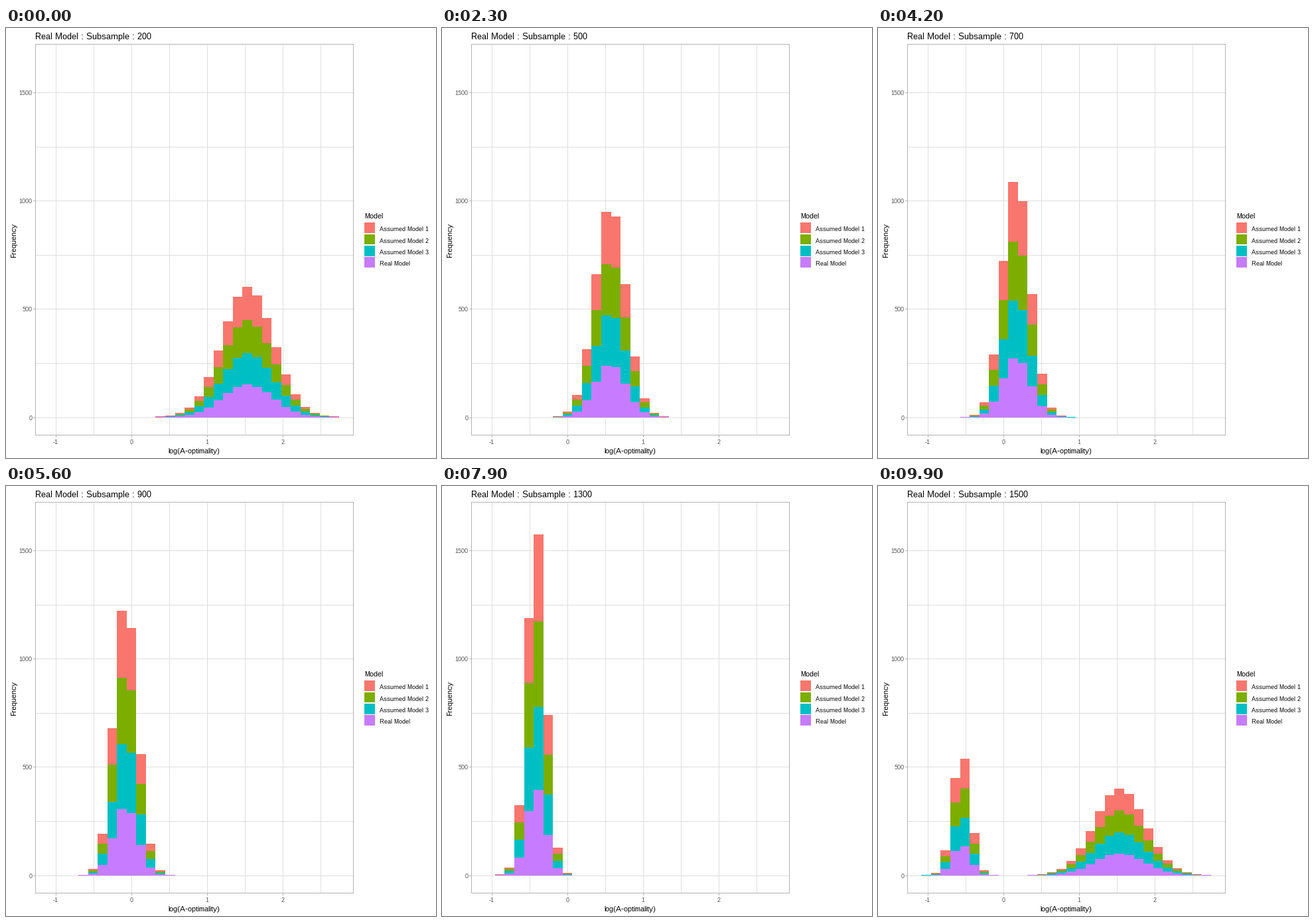
A matplotlib script for the animation above (10000 ms loop, 648 by 648 pixels).

```python
import math

import matplotlib.pyplot as plt
import numpy as np
from matplotlib.animation import FuncAnimation
from matplotlib.patches import Rectangle

plt.rcParams.update({
    "font.family": "Liberation Sans",
    "text.hinting": "native",
    "text.hinting_factor": 1,
})

SIZE, FRAMES, STEP_MS = 648, 100, 100
BINS, BIN_X0, BIN_W = 30, 65.4, 14.55
BASE = 587
ZERO_X, UNIT_X = 189, 114

# Name, colour and relative spread, from the top of the stack down.
MODELS = [("Assumed Model 1", "#F8766D", 0.98),
          ("Assumed Model 2", "#7CAE00", 1.0),
          ("Assumed Model 3", "#00BFC4", 1.03),
          ("Real Model", "#C77CFF", 1.0)]
RUNS = 1000
SIZES = range(200, 1501, 100)
STARTS = [*range(4, 28, 8), *range(28, 99, 7)]

edges = BIN_X0 + BIN_W * np.arange(BINS + 1)


def count_y(count):
    return np.round(586.6 - 0.3264 * np.asarray(count))


def bell_cdf(z):
    """Normal curve with slightly heavy tails."""
    def phi(v):
        return 0.5 * math.erf(v / math.sqrt(2))
    return 0.95 * phi(z / 0.97) + 0.05 * phi(z / 1.5)


def histogram(size):
    """Stacked counts for one subsample size, one row per model."""
    growth = math.log(size / 200)
    mean = 1.54 - 1.08 * growth + 0.02 * growth ** 2
    sd = 0.34 * (200 / size) ** 0.55
    z = ((edges - ZERO_X) / UNIT_X - mean) / sd
    counts = [RUNS * np.diff([bell_cdf(v / spread) for v in z])
              for _, _, spread in MODELS]
    return np.cumsum(np.round(counts)[::-1], axis=0)[::-1]


STACKS = [histogram(size) for size in SIZES]

fig = plt.figure(figsize=(SIZE / 72, SIZE / 72), dpi=72, facecolor="white")
ax = fig.add_axes([0, 0, 1, 1])
ax.set_xlim(0, SIZE)
ax.set_ylim(SIZE, 0)
ax.axis("off")


def box(x, y, w, h, color, z=1):
    ax.add_patch(Rectangle((x, y), w, h, fc=color, lw=0, aa=False, zorder=z))


def label(x, y, text, size, color="black", **kw):
    return ax.text(x, y, text, fontsize=size, color=color,
                   va="baseline", **kw)


GRID, BORDER, TICK_TEXT = "#DEDEDE", "#B3B3B3", "#4D4D4D"

# Grid and panel border
for x in range(75, 500, UNIT_X // 2):
    box(x, 25, 1, 588, GRID)
for count in range(0, 1501, 250):
    box(45, count_y(count), 478, 1, GRID)
for y in (24, 613):
    box(44, y, 480, 1, BORDER, 4)
for x in (44, 523):
    box(x, 24, 1, 590, BORDER, 4)

# Axes
for value in range(-1, 3):
    x = ZERO_X + UNIT_X * value
    box(x, 614, 1, 3, BORDER)
    label(x, 627, str(value), 9, TICK_TEXT, ha="center")
for value in range(0, 1501, 500):
    y = count_y(value)
    box(41, y, 3, 1, BORDER)
    label(39.5, y + 4, str(value), 9, TICK_TEXT, ha="right")
label(283.5, 641, "log(A-optimality)", 11, ha="center")
label(15, 319.5, "Frequency", 11, ha="center", rotation=90,
      rotation_mode="anchor")

# Legend
label(540, 287, "Model", 11)
for i, (name, color, _) in enumerate(MODELS):
    top, bottom = round(293.4 + 17.28 * i), round(309.2 + 17.28 * i)
    box(540, top, 16, bottom - top, color)
    label(563, top + 13, name, 9)

title = label(44, 17, "", 13)
bars = [ax.stairs(np.full(BINS, BASE), np.round(edges), baseline=BASE,
                  fill=True, color=color, lw=0, aa=False, zorder=2)
        for _, color, _ in MODELS]


def draw(frame):
    begun = sum(start <= frame for start in STARTS)
    old, new, t = 0, 0, 1
    if begun:
        old, new = begun - 1, begun % len(STACKS)
        steps = 4 if begun <= 3 else 3
        t = min((frame - STARTS[old] + 1) / steps, 1)
    stack = (1 - t) * STACKS[old] + t * STACKS[new]
    for bar, top in zip(bars, count_y(stack)):
        bar.set_data(values=top)
    shown = SIZES[new if t == 1 else old]
    title.set_text(f"Real Model : Subsample : {shown}")
    return [*bars, title]


anim = FuncAnimation(fig, draw, frames=FRAMES, interval=STEP_MS,
                     repeat=True, repeat_delay=0, blit=False)
plt.show()
```
